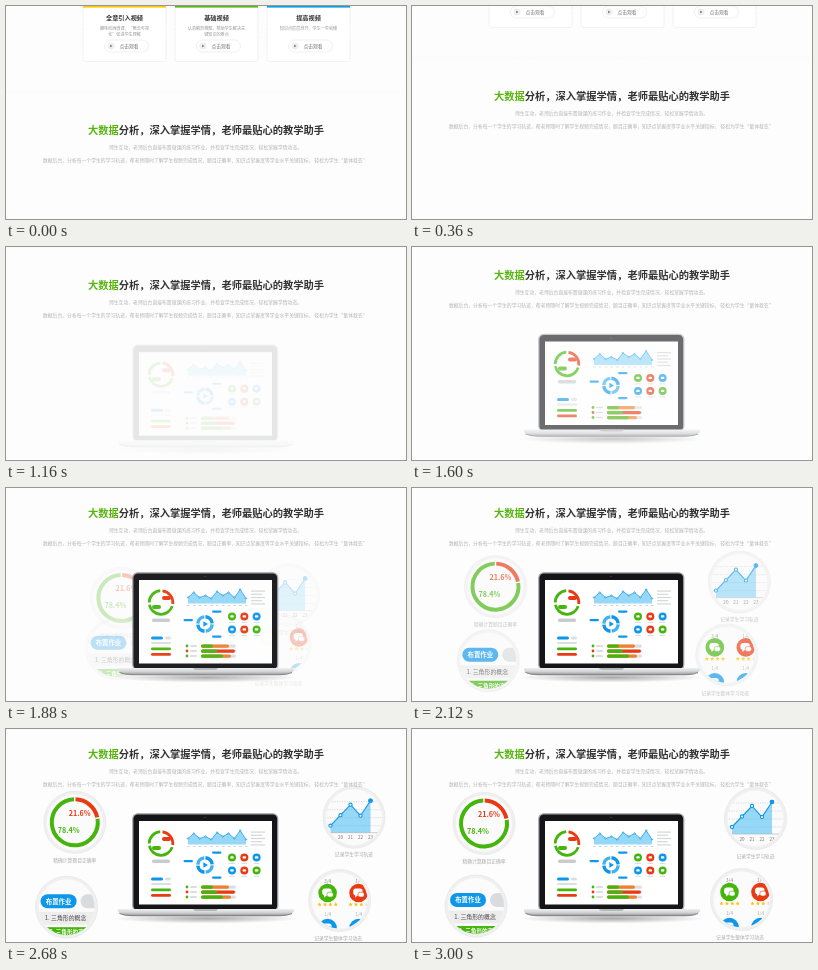
An HTML page for the animation above (3.88 s loop, 400 by 213 pixels).

```html
<!DOCTYPE html>
<html lang="zh-CN">
<head>
<meta charset="utf-8">
<style>
  html, body { margin: 0; width: 100%; height: 100%; overflow: hidden; background: #fdfdfd; }
  svg { display: block; width: 100%; height: 100%; font-family: "Noto Sans CJK SC", "Noto Sans CJK", "Noto Sans", sans-serif; }
</style>
</head>
<body>
<svg id="stage" viewBox="0 0 400 213"></svg>
<script>
const GREEN = '#45b50c', RED = '#e93a14', BLUE = '#0e96ea', GREY = '#dcdfe1';
const LOOP = 3880;

// Markup helpers; text is centred on (x, y)
const text = (x, y, size, fill, str, extra = '') =>
  `<text x="${x}" y="${y + size * 0.37}" font-size="${size}" fill="${fill}" text-anchor="middle" ${extra}>${str}</text>`;
const rect = (x, y, w, h, fill, r = 0, extra = '') =>
  `<rect x="${x}" y="${y}" width="${w}" height="${h}" rx="${r}" fill="${fill}" ${extra}/>`;
const circle = (x, y, r, fill, extra = '') =>
  `<circle cx="${x}" cy="${y}" r="${r}" fill="${fill}" ${extra}/>`;
const path = (d, fill, stroke = 'none', width = 0, extra = '') =>
  `<path d="${d}" fill="${fill}" stroke="${stroke}" stroke-width="${width}" ${extra}/>`;
const group = (id, body) => `<g id="${id}">${body}</g>`;

// Ring section between two fractions of a turn, clockwise from the top
function arc(x, y, r, from, to, color, width) {
  const at = f => {
    const a = (f - 0.25) * 2 * Math.PI;
    return `${(x + r * Math.cos(a)).toFixed(2)} ${(y + r * Math.sin(a)).toFixed(2)}`;
  };
  return path(`M${at(from)}A${r} ${r} 0 ${to - from > 0.5 ? 1 : 0} 1 ${at(to)}`, 'none', color, width);
}

function areaChart(points, base, line, dot) {
  const d = 'M' + points.map(p => p.join(' ')).join('L');
  const first = points[0][0], last = points[points.length - 1][0];
  return path(`${d}L${last} ${base}L${first} ${base}Z`, '#95d8f8') +
    path(d, 'none', BLUE, line) +
    points.map(([x, y]) => circle(x, y, dot, '#fff', `stroke="${BLUE}" stroke-width="${line}"`)).join('');
}

function card(x, color, title, lines) {
  const mid = x + 41.5;
  return rect(x, -60, 83, 115.5, '#fff', 3, 'stroke="#dadada" stroke-width=".6" stroke-dasharray="1.5 1"') +
    rect(x, 0, 83, 1.6, color) +
    text(mid, 12, 6.16, '#333', title, 'font-weight="700"') +
    lines.map((s, i) => text(mid, 22 + i * 6, 4.1, '#999', s)).join('') +
    rect(mid - 20, 34, 44, 12, '#fff', 6, 'stroke="#e6e6e6" stroke-width=".6"') +
    circle(mid - 13.5, 40, 3.2, '#f3f3f3', 'stroke="#ddd" stroke-width=".4"') +
    path(`M${mid - 14.4} 38.5v3l2.4 -1.5z`, '#777') +
    text(mid + 4.5, 40, 4.79, '#777', '点击观看');
}

function heading() {
  return path('M0 86H400', 'none', '#f3f3f3', 0.6, 'stroke-dasharray="2 2"') +
    text(200, 124, 10.27, '#333',
      `<tspan fill="#58b510">大数据</tspan>分析，深入掌握学情，老师最贴心的教学助手`, 'font-weight="700"') +
    text(199.5, 141, 4.83, '#b4b4b4', '师生互动，老师后台直接布置微课的练习作业，并检查学生完成情况，轻松掌握学情动态。') +
    text(199.2, 154, 4.83, '#b4b4b4', '数据后台，分析每一个学生的学习轨迹，帮老师随时了解学生视频完成情况，' +
      '题目正确率，知识点掌握度等学业水平关键指标， 轻松为学生“量体裁衣”');
}

function dashboard() {
  let s = arc(155, 117, 11.8, 0.02, 0.27, RED, 2.8) + arc(155, 117, 11.8, 0.3, 0.72, GREEN, 2.8) +
    arc(155, 117, 11.8, 0.75, 0.99, GREEN, 2.8) +
    rect(156, 110.5, 9, 4, RED, 2) + rect(146, 119.5, 9, 4, GREEN, 2) +
    rect(146, 133, 18, 3.4, '#c9cccf', 1.5);
  s += rect(145, 151, 12, 3, BLUE, 1.5) + rect(159, 151, 6, 3, GREY, 1.5) +
    rect(145, 156.5, 20, 2, GREY, 1) +
    rect(145, 162, 20, 2.8, GREEN, 1.4) + rect(145, 167.5, 20, 2.8, RED, 1.4);

  const heights = [6, 11, 6, 8, 5, 12, 8, 11, 6, 14, 5];
  s += areaChart(heights.map((h, i) => [182 + i * 5.8, 118 - h]), 118, 0.7, 0.7);
  for (let i = 0; i < 11; i++) s += rect(181 + i * 5.8, 119.5, 2.6, 1, '#d2d5d8');
  for (let i = 0; i < 5; i++) s += rect(245, 105 + i * 3.2, i % 2 ? 11 : 14, 1.2, '#d4d6d8');

  for (let i = 0; i < 4; i++) s += arc(199, 138.5, 7.2, i / 4 + 0.01, i / 4 + 0.235, i % 2 ? '#3fb2f2' : BLUE, 3.4);
  s += path('M197.4 135.7v5.6l4.6 -2.8z', BLUE);
  for (const [x, y] of [[177.5, 133.5], [206, 125], [206, 150]]) s += rect(x, y, 9.5, 2.2, BLUE, 1.1);

  [GREEN, RED, BLUE, BLUE, RED, GREEN].forEach((c, i) => {
    const x = 226 + (i % 3) * 12.3, y = 131 + (i > 2 ? 13 : 0);
    s += circle(x, y, 4, c) + rect(x - 1.7, y - 1.3, 3.4, 2.4, '#fff', 0.9) + rect(x - 3, y + 5.2, 6, 1.2, GREY, 0.6);
  });

  [[12, 28], [16, 34], [22, 30]].forEach(([a, b], i) => {
    const y = 159 + i * 5;
    s += circle(181, y + 1.5, 1.4, [GREEN, RED, GREEN][i]) + rect(184, y + 0.7, 7, 1.6, '#cfd2d5', 0.8) +
      rect(195, y, 35, 3.2, GREY, 1.6) + rect(195, y, b, 3.2, i === 1 ? RED : '#f0802c', 1.6) +
      rect(195, y, a, 3.2, GREEN, 1.6);
  });
  return s;
}

function laptop() {
  return '<ellipse cx="200" cy="192" rx="92" ry="5" fill="url(#shade)"/>' +
    rect(126.8, 87.3, 145, 97, '#151517', 5, 'stroke="#a9abad" stroke-width="1.2"') +
    circle(199, 91, 0.6, '#555') +
    rect(133, 94.5, 133, 83.5, '#fff') + dashboard() +
    path('M112 182.5H288V185Q285 189 274 189.2H125Q114 189 112 185Z', 'url(#metal)') +
    path('M187 182.5H212Q211.5 184.6 209 184.6H190Q187.5 184.6 187 182.5Z', '#b4b6b8') +
    path('M113.5 187Q118 189.2 126 189.2H274Q282 189.2 286 187', 'none', '#77797b', 0.9);
}

function accuracy() {
  return arc(72, 94.5, 23, 0.225, 0.995, GREEN, 4) + arc(72, 94.5, 23, 0.005, 0.215, RED, 4) +
    text(77, 85, 7.2, RED, '21.6%', 'font-weight="700"') +
    text(66, 102, 7.2, GREEN, '78.4%', 'font-weight="700"');
}

function track() {
  const points = [[320, 98], [330, 87.5], [340, 77], [350, 88], [360, 73]];
  let s = areaChart(points, 105, 1.1, 1.6) + circle(360, 73, 2.3, BLUE);
  for (let y = 74; y < 105; y += 8) s += path(`M312 ${y}H376`, 'none', '#8fa0aa', 0.6, 'stroke-dasharray="1.2 1.2" opacity=".6"');
  points.forEach(([x], i) => s += text(x, 110, 4.6, '#777', 19 + i));
  return s + path('M312 105H376', 'none', '#a5afb6', 0.6);
}

function homework() {
  return rect(38, 164, 36, 14, BLUE, 7) + text(56, 171, 6.4, '#fff', '布置作业', 'font-weight="700"') +
    rect(78, 164, 40, 14, '#d9dcde', 7) +
    rect(30, 181.5, 70, 13, '#ededed') + text(63, 188, 5.9, '#444', '1. 三角形的概念', 'font-weight="500"') +
    rect(30, 197, 70, 16, GREEN) + text(64, 202, 5.6, '#fff', '2. 三角形的高', 'font-weight="700"');
}

function badge(x, y, color) {
  return circle(x, y, 9.3, color) + rect(x - 5.4, y - 4.4, 9.4, 6.8, '#fff', 2.8) +
    path(`M${x - 3.4} ${y + 1.4}v3.2l3.2 -2.6z`, '#fff') +
    rect(x - 0.6, y - 0.8, 6.2, 4.8, '#fff', 2, `stroke="${color}" stroke-width=".6"`);
}

function star(x, y, color) {
  let d = '';
  for (let i = 0; i < 10; i++) {
    const r = i % 2 ? 1 : 2.3, a = i * Math.PI / 5;
    d += `${i ? 'L' : 'M'}${(x + r * Math.sin(a)).toFixed(2)} ${(y - r * Math.cos(a)).toFixed(2)}`;
  }
  return path(d + 'Z', color);
}

function activity() {
  let s = '';
  [[317.5, '3/4', GREEN, 4], [348.5, '1/4', RED, 3]].forEach(([x, label, color, stars]) => {
    s += text(x, 151.5, 4.6, '#888', label) + badge(x, 163, color) + badge(x, 198, BLUE) +
      text(x, 184, 4.6, '#aaa', '1/4');
    for (let i = 0; i < 4; i++) s += star(x - 8 + i * 5.4, 174.5, i < stars ? '#fbc010' : '#dcdcdc');
  });
  return s;
}

// Bubble centres, contents and captions
const bubbles = [
  { x: 72, y: 94.5, draw: accuracy, label: '精确计算题目正确率', lx: 72, ly: 132 },
  { x: 343.5, y: 89.5, draw: track, label: '记录学生学习轨迹', lx: 343.5, ly: 127 },
  { x: 64, y: 177, draw: homework, label: '', lx: 64, ly: 216 },
  { x: 329.5, y: 170.5, draw: activity, label: '记录学生整体学习动态', lx: 328, ly: 208.5 }
];

const bubble = (b, i) => group('bubble' + i,
  circle(b.x, b.y, 31, '#f0f0f0', 'stroke="#e8e8e8" stroke-width=".8"') + circle(b.x, b.y, 28, '#fbfbfb') +
  `<clipPath id="clip${i}">${circle(b.x, b.y, 28, '#000')}</clipPath>` +
  `<g clip-path="url(#clip${i})">${b.draw()}</g>` +
  text(b.lx, b.ly, 4.79, '#aaa', b.label));

const stage = document.getElementById('stage');
stage.innerHTML =
  `<defs>
    <linearGradient id="metal" x2="0" y2="1"><stop stop-color="#eeeff0"/><stop offset=".5" stop-color="#d3d5d7"/><stop offset="1" stop-color="#989a9d"/></linearGradient>
    <radialGradient id="shade"><stop stop-color="#aaa"/><stop offset="1" stop-color="#aaa" stop-opacity="0"/></radialGradient>
  </defs>` +
  rect(0, 0, 400, 213, '#fdfdfd') +
  bubbles.map(bubble).join('') +
  group('laptop', laptop()) +
  group('page',
    card(77, '#ffc800', '全章引入视频', ['趣味动画微课，“概念可视', '化”促进学生理解']) +
    card(169, '#5cb80e', '基础视频', ['认真解剖难题，帮助学生解决关', '键知识的难点']) +
    card(261, '#0c9fe8', '提高视频', ['知识点层层剖开，学生一学就懂']) +
    heading());

const el = id => document.getElementById(id);
const page = el('page'), machine = el('laptop');
const bubbleEls = bubbles.map((b, i) => el('bubble' + i));

const progress = (t, from, to) => Math.min(1, Math.max(0, (t - from) / (to - from)));
const easeInOut = p => p < 0.5 ? 2 * p * p : 1 - 2 * (1 - p) ** 2;
// Distance left on an ease-out that overshoots slightly
const backLeft = p => 2 * (1 - p) ** 3 - (1 - p) ** 2;

// Wheel ticks: start time and distance; the last one reaches the page end
const ticks = [[0, 34], [570, 33], [1000, 29], [1600, 2.5]];
const LAPTOP_SCROLL = 96;
const ORIGIN = { x: 185, y: 135 };

function render(time) {
  const t = Math.floor(time / 40) * 40;
  const scroll = ticks.reduce((sum, [at, d]) => sum + d * easeInOut(progress(t, at, at + 280)), 0);
  page.setAttribute('transform', `translate(0 ${-scroll})`);

  machine.setAttribute('transform', `translate(0 ${LAPTOP_SCROLL - scroll})`);
  machine.setAttribute('opacity', progress(t, 1080, 1920));

  // The bubbles pause briefly before they settle
  const held = t > 2120 && t < 2280 ? 2120 : t;
  const left = backLeft(progress(held, 1600, 3000));
  const opacity = progress(held, 1720, 2320);
  bubbles.forEach((b, i) => {
    const dx = (ORIGIN.x - b.x) * left, dy = (ORIGIN.y - b.y) * left;
    bubbleEls[i].setAttribute('transform', `translate(${dx} ${dy})`);
    bubbleEls[i].setAttribute('opacity', opacity);
  });
}

const start = performance.now();
function tick() {
  render((performance.now() - start) % LOOP);
  requestAnimationFrame(tick);
}
tick();
</script>
</body>
</html>
```
